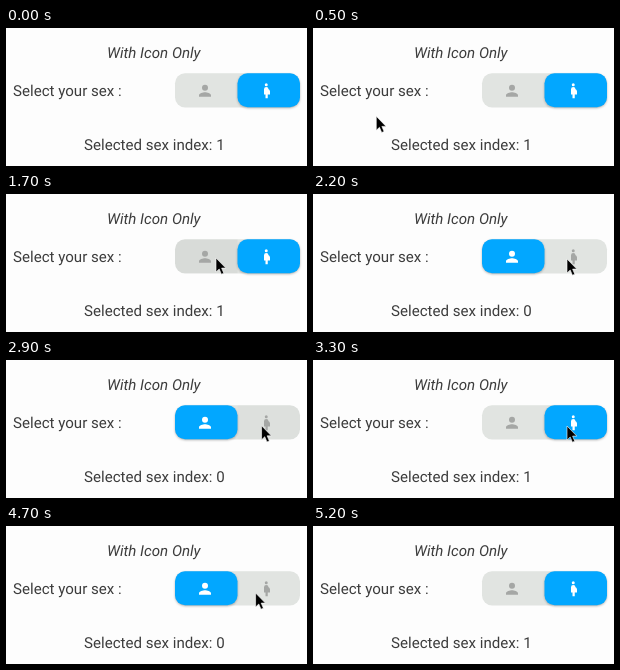
Write an HTML page that moves like this. It is 301x138 px and loops after 5700 ms.

```html
<!DOCTYPE html>
<html lang="en">
<head>
<meta charset="utf-8">
<title>Icon toggle</title>
<style>
  html, body { margin: 0; width: 100%; height: 100%; overflow: hidden; background: #fdfdfd; }
  svg { display: block; width: 100vw; height: 100vh; }
  text { font: 15.1px Roboto, sans-serif; fill: #3c3c3c; text-rendering: geometricPrecision; }
  .title { font-style: italic; }
  #thumb { fill: #02a7ff; filter: drop-shadow(0 1px 1px #0004); }
</style>
</head>
<body>
<svg viewBox="0 0 301 138">
  <defs><clipPath id="track"><rect x="169" y="45.2" width="125" height="34.3" rx="10"/></clipPath></defs>
  <text class="title" x="101" y="30">With Icon Only</text>
  <text x="7" y="68.2">Select your sex :</text>
  <text x="78" y="122">Selected sex index: <tspan id="index">1</tspan></text>
  <rect x="169" y="45.2" width="125" height="34.3" rx="10" fill="#e1e4e1"/>
  <rect id="press" y="45.2" width="62.5" height="34.3" clip-path="url(#track)"/>
  <rect id="thumb" y="45.2" width="62.5" height="34" rx="10"/>
  <path class="icon" transform="translate(190 53.7) scale(.75)"
    d="M12 12a4 4 0 1 0 0-8 4 4 0 0 0 0 8zm0 2c-2.67 0-8 1.34-8 4v2h16v-2c0-2.66-5.33-4-8-4z"/>
  <path class="icon" transform="translate(252 53.7) scale(.75)"
    d="M9 4a2 2 0 1 1 4 0 2 2 0 0 1-4 0zm7 9c0-1.34-.83-2.5-2-3a3 3 0 0 0-6 0v7h2v5h3v-5h3z"/>
  <path id="cursor" d="M0 0V14L3.2 11 5.4 16.2 7.8 15.2 5.6 10.1H9.8Z" fill="#000" stroke="#fff" stroke-width=".6"/>
</svg>
<script>
const LOOP = 5700, STEP = 100, PRESS = 200;
const ENTER = 100, LEAVE = 5200;
const $ = id => document.getElementById(id);
const icons = document.querySelectorAll('.icon');

const moves = [
  { start: 100, end: 600, x: 64, y: 83 },
  { start: 600, end: 1170, x: 210, y: 64 },
  { start: 1900, end: 2200, x: 254, y: 65 },
  { start: 2200, end: 2500, x: 260, y: 65 },
  { start: 2700, end: 3000, x: 254, y: 66 },
  { start: 3300, end: 3500, x: 203, y: 67 },
  { start: 4300, end: 4800, x: 255, y: 67 }
];
// Each tap selects the other option on release
const releases = [1800, 3100, 4000, 5100];

const clamp = k => Math.max(0, Math.min(1, k));
const ease = k => k * k * (3 - 2 * k);
const optionX = option => 169 + option * 62.5;

function cursorAt(time) {
  let x = 57, y = 134;
  for (const move of moves) {
    const k = ease(clamp((time - move.start) / (move.end - move.start)));
    x += (move.x - x) * k;
    y += (move.y - y) * k;
  }
  return [x, y];
}

function draw(time) {
  const taps = releases.filter(release => time >= release).length;
  const selected = (taps + 1) % 2, other = 1 - selected;
  const strength = clamp((time - releases[taps] + PRESS + STEP) / PRESS) || 0;

  $('index').textContent = selected;
  $('thumb').setAttribute('x', optionX(selected));
  $('press').setAttribute('x', optionX(other));
  $('press').setAttribute('opacity', strength * .04);
  icons.forEach((icon, i) => icon.setAttribute('fill', i === selected ? '#fff' : '#a5a7a5'));

  const visible = time >= ENTER && time < LEAVE;
  $('cursor').setAttribute('visibility', visible ? 'visible' : 'hidden');
  $('cursor').setAttribute('transform', `translate(${cursorAt(time)})`);
}

function frame() {
  draw(Math.floor(performance.now() % LOOP / STEP) * STEP);
  requestAnimationFrame(frame);
}
frame();
</script>
</body>
</html>
```
